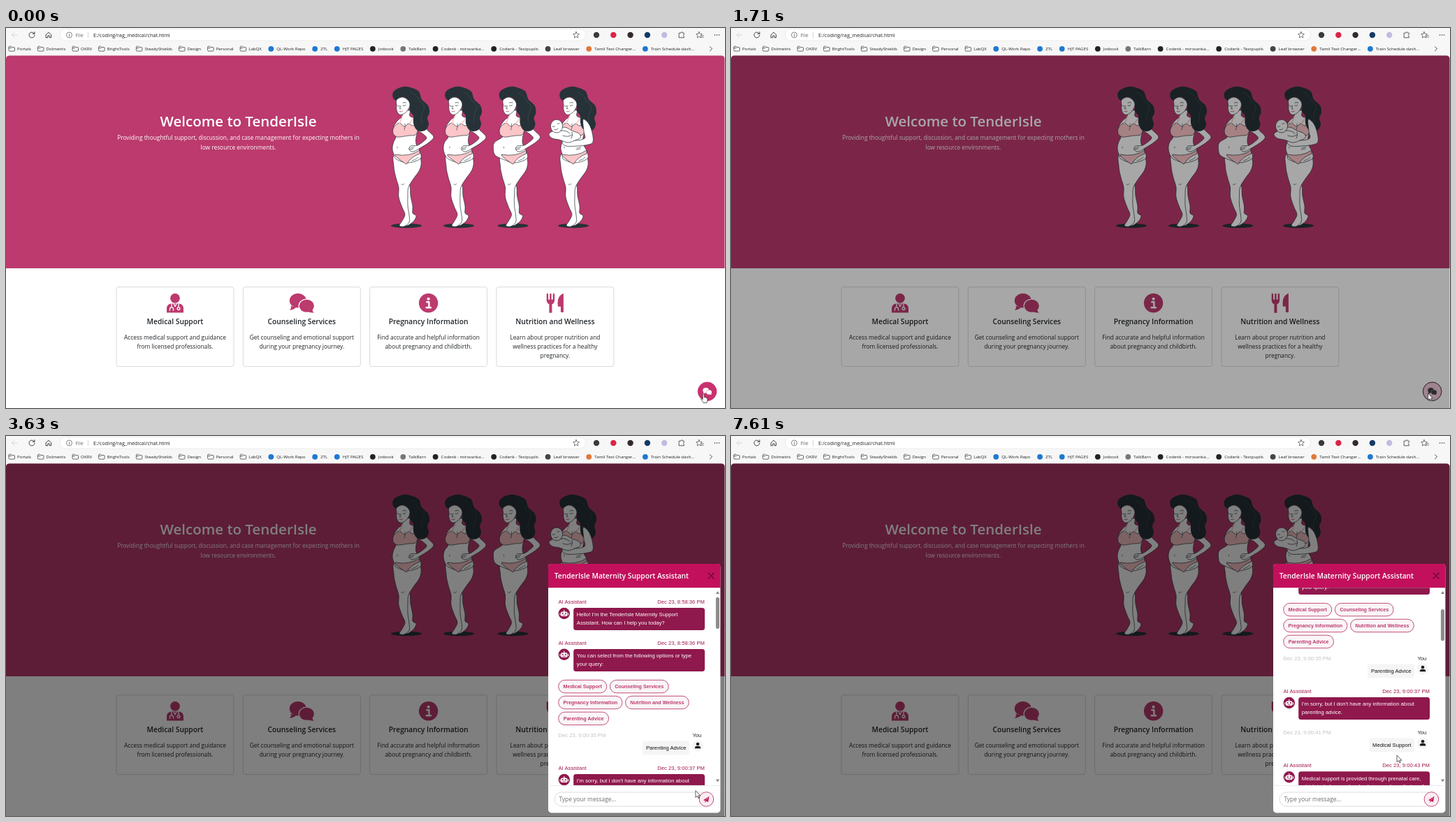
An HTML page for the animation above (8 s loop, 1029 by 544 pixels).

```html
<!DOCTYPE html>
<html lang="en">
<head>
<meta charset="utf-8">
<title>TenderIsle</title>
<style>
html, body { margin: 0; width: 100%; height: 100%; overflow: hidden; background: #fff; }
svg { display: block; width: 100vw; height: 100vh; }
text { font-family: "Open Sans", "Noto Sans", sans-serif; white-space: pre; }
.arial { font-family: "Liberation Sans", Arial, sans-serif; }
.line { fill: none; stroke-linecap: round; stroke-linejoin: round; }
.skin * { stroke: #263238; stroke-width: .7; }
</style>
</head>
<body>
<svg id="stage" viewBox="0 0 1029 544" preserveAspectRatio="none"></svg>
<script>
const LOOP = 8000;
const PINK = '#bc3a6e', WINE = '#8f184c', INK = '#263238';
const BRAND = 'TenderIsle';
const MID = 'text-anchor="middle"', END = 'text-anchor="end"', SEMI = 'font-weight="600"';

// ---------- drawing helpers ----------
const text = (x, y, size, str, fill = '#222', opt = '') =>
  `<text x="${x}" y="${y}" font-size="${size}" fill="${fill}" ${opt}>${str}</text>`;
const arial = (x, y, str, fill, opt = '', size = 7.68) => text(x, y, size, str, fill, `class="arial" ${opt}`);
const path = (d, fill, opt = '') => `<path d="${d}" fill="${fill}" ${opt}/>`;
const line = (d, color, w = .9) => `<path class="line" d="${d}" stroke="${color}" stroke-width="${w}"/>`;
const circle = (x, y, r, fill, opt = '') => `<circle cx="${x}" cy="${y}" r="${r}" fill="${fill}" ${opt}/>`;
const oval = (x, y, rx, ry, fill, opt = '') =>
  `<ellipse cx="${x}" cy="${y}" rx="${rx}" ry="${ry}" fill="${fill}" ${opt}/>`;
const box = (x, y, w, h, r, fill, opt = '') =>
  `<rect x="${x}" y="${y}" width="${w}" height="${h}" rx="${r}" fill="${fill}" ${opt}/>`;
const group = (body, opt = '') => `<g ${opt}>${body}</g>`;
const at = (x, y, body, scale = 1) => group(body, `transform="translate(${x} ${y}) scale(${scale})"`);
// Rectangle with only the top corners rounded.
const sheet = (x, y, w, h, r, fill, opt) =>
  path(`M${x} ${y + h}v${r - h}q0 ${-r} ${r} ${-r}h${w - 2 * r}q${r} 0 ${r} ${r}v${h - r}z`, fill, opt);

// Closed smooth curve through a few key points.
function blob(points, fill) {
  const p = points.split(' ').map(s => s.split(',').map(Number));
  const get = i => p[(i + p.length) % p.length];
  const lean = (i, dir) => get(i).map((v, k) => (v + dir * (get(i + 1)[k] - get(i - 1)[k]) / 6).toFixed(2));
  return path(`M${p[0]}` + p.map((_, i) => `C${lean(i, 1)} ${lean(i + 1, -1)} ${get(i + 1)}`).join('') + 'Z', fill);
}

const pen = document.createElement('canvas').getContext('2d');
function widthOf(str, size, family, weight = 400) {
  pen.font = `${weight} 100px ${family}`;
  return pen.measureText(str).width * size / 100;
}
const SANS = '"Open Sans", "Noto Sans", sans-serif', ARIAL = '"Liberation Sans", Arial, sans-serif';

// ---------- browser bars ----------
const star = x => line(`M${x} 5.4l1.3 2.900 3.1.4-2.300 2.100.6 3.200-2.700-1.600-2.700 1.600.6-3.200-2.300-2.100 3.100-.4z`, '#444', .7);

function toolbar() {
  const addons = ['#3a3a3a', '#dc2446', '#33282c', '#123a66', '#c3bbdf'].map((c, i) => circle(845 + i * 24.3, 10, 4.2, c));
  const dots = [-3, 0, 3].map(dx => circle(1017.5 + dx, 10, .8, '#333'));
  return box(0, 0, 1029, 46, 0, '#f7f7f7')
    + box(77.5, 1.5, 752, 16.5, 8.2, '#fff', 'stroke="#e2e2e2" stroke-width=".6"')
    + line('M16 10H8.5M11.7 6.7L8.4 10l3.3 3.3', '#cfcfcf', .8)
    + line('M40.6 8.2A4 4 0 1 0 41 10.4M41 5.6V8.4H38.2', '#333')
    + line('M57.4 9.6L61 6.2l3.6 3.4V13.8H62.2V11H59.8v2.8H57.4z', '#333')
    + circle(90.5, 10, 4, 'none', 'stroke="#555" stroke-width=".7"') + line('M90.5 9.6V12M90.5 8v.1', '#555', .8)
    + text(99.5, 12.6, 7, 'File', '#666') + line('M117.5 6v8', '#bbb', .6)
    + text(125, 12.6, 7.3, 'E:/coding/rag_medical/chat.html') + star(816)
    + line('M963.5 7.2h2.2a1.4 1.4 0 0 1 2.8 0h1.8v2.2a1.4 1.4 0 0 0 0 2.6v1.8h-6.8z', '#333', .8)
    + star(992) + line('M995.4 10.8h3M995.4 13h3', '#444', .7) + addons.join('') + dots.join('');
}

const FOLDERS = ['Portals', 'Dolmetris', 'OKRV', 'BrightTools', 'SteadyShields', 'Design', 'Personal', 'LabQX'];
const SITES = [
  ['QL-Work Repo', '#1f78d1'], ['ZTL', '#1f78d1'], ['HJT PAGES', '#1f78d1'], ['Jotbook', '#222'],
  ['TalkBarn', '#777'], ['Codenk - mirovanka...', '#222'], ['Codenk - Testpupils', '#222'],
  ['Leaf browser', '#444'], ['Tamil Text Changer...', '#e0793c'], ['Train Schedule dash...', '#1f78d1']
];
function bookmarks() {
  const size = 6.15, gap = 21.5;
  let x = 16;
  return [...FOLDERS.map(name => [name]), ...SITES].map(([name, color]) => {
    const icon = color ? circle(x - 8, 29.8, 3.9, color)
      : line(`M${x - 12} 27.2q0-1 1-1h2l1.2 1.3h3.2q1 0 1 1v3.6q0 1-1 1h-6.4q-1 0-1-1zM${x - 12} 28.6h3.4`, '#444', .8);
    const label = text(x, 32, size, name);
    x += widthOf(name, size, SANS) + gap;
    return icon + label;
  }).join('') + line('M1007.5 26.8l3 3-3 3', '#333');
}

// ---------- hero figures ----------
const HAIR = blob('574,84 562,86 554,92 554,100 559,104 563,100 570,99 576,104 578,112 578,119 583,126 583,136 587,145 594,148 602,145 605,137 603,129 606,121 604,111 595,102 590,90', INK);
const FACE = blob('559,103 559,110 559,117 562,123 567,124 574,119 578,110 575,103 567,99', '#fff');
const LEGS = blob('572,222 578,226 579,240 582,255 582,265 587,269 583,277 574,283 572,279 576,269 571,250', '#fff')
  + blob('557,180 555,198 558,214 562,228 562,242 567,257 571,267 567,276 563,283 570,284 577,278 577,268 575,254 575,240 576,228 583,216 592,203 594,190 588,178', '#fff');
const BRA = blob('555,142 554,151 560,156 570,155 577,154 586,153 589,146 587,138 582,140 576,137 570,141 563,136', '#fcc5c8');
const BRIEF = path('M557 181Q577 185 592 175V180Q580 184 573 195Q566 191 557 183Z', '#fcc5c8');
const ARM = blob('586,131 595,137 604,147 612,156 605,164 594,171 583,177 577,174 579,169 589,168 598,162 602,157 596,151 587,144', '#fff');
const CRADLE = blob('587,131 595,137 600,150 601,163 594,167 578,169 563,169 557,164 561,159 575,161 589,158 588,148', '#fff');
const BABY = blob('545,147 538,152 543,158 553,160 565,164 575,161 583,157 581,151 571,147 560,142', '#fff')
  + oval(549, 140.5, 8.6, 9.4, '#fff')
  + line('M543 141q2 1.4 3.4-.4M550 137q1.6 1 3-.6M546 145.5q3 1.4 5-1.6M555 147q8-1 13 4M558 154q7 3 13-1M571 149q2 4-1 9', INK);

// belly: leftmost x of the bump
function woman(dx, belly, baby) {
  const torso = blob(`568,120 567,127 561,132 555,141 555,151 558,156 ${belly + 1.5},164 ${belly},173 ${belly + 2.5},182 559,188 575,193 593,187 592,176 587,166 587,156 590,146 591,136 587,130 578,126 578,118`, '#fff');
  return at(dx, 0, oval(573, 283, 22, 3.3, INK)
    + group(LEGS + torso + BRIEF + BRA + (baby ? '' : ARM), 'class="skin"')
    + line('M563 137L567.5 126M577 137L583 129.5', '#fcc5c8', 1.6)
    + line('M571 137q1 5-1 9M560 170q.6 1 0 2M578 172l6-1.5M577 174l6-1M581 190q5-1 9-5M566 224q3 1 4-1', INK, .6)
    + HAIR + group(FACE + (baby ? CRADLE + BABY : ''), 'class="skin"')
    + line('M560.5 111.5q2 1.5 3.600 0M568 111q2.400 1.400 4-.6M568 107q2.400-1 4.600 0M565 112l-1.800 3.400 2 .4', INK, .7)
    + line('M563 119.4q2 1.400 4.400-.4', '#c8586a')
    + line('M579 92q10 3 13 13q9 4 6 12q-5 9-3 18', '#46545b', .5));
}

// ---------- page ----------
// Two overlapping speech bubbles, centred on the origin.
const comments = (fill, gap) =>
  path('M-16 4Q-14 7-17.500 10Q-12 10-8 6Z', fill) + oval(-5.5, -3.5, 12, 10.3, fill)
  + group(oval(7, 4, 10.6, 9, fill), `stroke="${gap}" stroke-width="2.4" paint-order="stroke"`)
  + path('M16 8Q14 11 17.500 14Q12 14 8 12Z', fill);

const doctor = circle(0, -7, 6.9, PINK) + sheet(-12, .6, 24, 13, 7.5, PINK)
  + line('M-5 1V6M-7.500 10.500V8.500Q-7.500 6-5 6T-2.500 8.500V10.500M5 1V6M-2 1L0 5 2 1', '#fff', 1.3)
  + circle(5, 7.8, 1.9, 'none', 'stroke="#fff" stroke-width="1.3"');
const info = circle(0, 0, 13.7, PINK) + circle(0, -6, 2.1, '#fff')
  + line('M-2.300-1.500H.8V6M-3 6.400H3.400', '#fff', 2.4);
const cutlery = line('M-11-12.500V-4M-6.500-12.500V-4M-2-12.500V-4', PINK, 2.4)
  + sheet(-8.5, 0, 4, 14, 1, PINK) + path('M-12.200-5H-.8Q-.8 2-6.500 2T-12.200-5Z', PINK)
  + path('M12-13.700V12.500Q10 14.500 8 12.500V5H4Q2-10 12-13.700Z', PINK);

const CARDS = [
  [doctor, 'Medical Support', 'Access medical support and guidance', 'from licensed professionals.'],
  [comments(PINK, '#fff'), 'Counseling Services', 'Get counseling and emotional support', 'during your pregnancy journey.'],
  [info, 'Pregnancy Information', 'Find accurate and helpful information', 'about pregnancy and childbirth.'],
  [cutlery, 'Nutrition and Wellness', 'Learn about proper nutrition and', 'wellness practices for a healthy', 'pregnancy.']
];
function card([icon, title, ...rows], i) {
  const x = 242 + i * 181.3;
  return box(x - 84, 370.8, 168, 113.8, 3.3, 'none', 'stroke="#d5d5d5" stroke-width=".9"')
    + at(x, 393.8, icon) + text(x, 423.7, 10.25, title, '#212529', `${MID} ${SEMI}`)
    + rows.map((row, n) => text(x, 445.5 + n * 13.1, 8.35, row, '#212529', MID)).join('');
}

function page() {
  return sheet(0, 39.5, 1028.5, 504.5, 5, '#fff') + sheet(0, 39.5, 1028.5, 304.5, 5, PINK)
    + text(332.5, 141.2, 20.5, `Welcome to ${BRAND}`, '#fff', `${MID} ${SEMI}`)
    + text(332.5, 160.4, 8.34, 'Providing thoughtful support, discussion, and case management for expecting mothers in', '#fff', MID)
    + text(332.5, 173.5, 8.34, 'low resource environments.', '#fff', MID)
    + woman(0, 553) + woman(75, 551) + woman(152.5, 545) + woman(239, 555, true)
    + CARDS.map(card).join('')
    + group(circle(1003.6, 520.3, 13.3, 'var(--fill)', 'stroke="var(--rim)"')
      + at(1003.6, 520, comments('var(--icon)', 'var(--fill)'), .36), 'id="opener"');
}

// ---------- chat window ----------
const robot = box(-4.6, -2.6, 9.2, 6.6, 1.6, '#fff') + line('M0-4.800V-2.500M-5.800-.3V2M5.800-.3V2', '#fff', 1.1)
  + circle(-2, 0, 1, WINE) + circle(2, 0, 1, WINE) + line('M-2 2.400H2', WINE, .7);
const person = circle(0, -2, 2.3, '#1b1b1b') + sheet(-4.2, .9, 8.4, 3.3, 2.7, '#1b1b1b');

const botSays = (y, time, ...rows) =>
  arial(790.5, y + 2.7, 'AI Assistant', '#a3174f') + arial(1000, y + 2.7, time, '#a3174f', END)
  + circle(798.8, y + 16.6, 8.2, WINE) + at(798.8, y + 16.6, robot)
  + box(812.2, y + 8.7, 187.8, 8.6 + rows.length * 11.7, 3.5, WINE)
  + rows.map((row, i) => arial(816.8, y + 21 + i * 11.6, row, '#fff')).join('');

function userSays(y, time, msg) {
  const w = widthOf(msg, 7.68, ARIAL) + 9;
  return arial(790.5, y + 2.7, time, '#c2c2c2') + arial(995.4, y + 2.7, 'You', '#222', END)
    + box(978 - w, y + 8.4, w, 20, 3.5, '#f5f5f5') + arial(973.5, y + 21, msg, '#111', END)
    + circle(990, y + 15.5, 8.2, '#f5f5f5') + at(990, y + 15, person);
}

// Pills flow from left to right and wrap at the edge.
function options(y) {
  const left = 790.7, size = 7.13;
  let x = left;
  return [...CARDS.map(c => c[1]), 'Parenting Advice'].map(label => {
    const w = widthOf(label, size, ARIAL, 700) + 13.6;
    if (x + w > 1000) { x = left; y += 22.9; }
    const pill = box(x, y - 9.2, w, 18.4, 9.2, '#faf5f7', `stroke="${PINK}" stroke-width=".9"`)
      + arial(x + w / 2, y + 2.5, label, PINK, `${MID} font-weight="700"`, size);
    x += w + 4.6;
    return pill;
  }).join('');
}

const messages = () =>
  botSays(237.4, 'Dec 23, 8:58:36 PM', `Hello! I'm the ${BRAND} Maternity Support`, 'Assistant. How can I help you today?')
  + botSays(296.2, 'Dec 23, 8:58:36 PM', 'You can select from the following options or type', 'your query:')
  + options(358.6)
  + userSays(428, 'Dec 23, 9:00:35 PM', 'Parenting Advice')
  + botSays(475.4, 'Dec 23, 9:00:37 PM', "I'm sorry, but I don't have any information about", 'parenting advice.')
  + userSays(534.2, 'Dec 23, 9:00:41 PM', 'Medical Support')
  + botSays(581.6, 'Dec 23, 9:00:43 PM', 'Medical support is provided through prenatal care,', 'which includes regular check-ups and monitoring of', 'your health.');

function chat() {
  return box(776, 183, 246.4, 356.4, 4.4, '#fff') + sheet(776, 183, 246.4, 34.3, 4.4, '#c2105c')
    + text(784.7, 204.4, 10.25, `${BRAND} Maternity Support Assistant`, '#fff', SEMI)
    + line('M1005.2 196.2l8 8M1013.2 196.2l-8 8', '#4d0a28', 1.1)
    + group(group(messages(), 'id="thread"'), 'clip-path="url(#view)"')
    + path('M1016 226l2.5-4 2.500 4zM1016 491.5l2.5 4 2.500-4z', '#858585')
    + box(1015.9, 230.7, 5, 45.4, 2.5, '#8b8b8b', 'id="thumb"')
    + line('M776 500.4H1022.4', '#dee2e6', .7)
    + box(785, 510, 222, 20, 10, '#fff', 'stroke="#d3d3d3" stroke-width=".8"')
    + text(791.4, 523, 8.38, 'Type your message...', '#6a6d70')
    + circle(1002.4, 520, 10.3, '#faedf2', `id="send" stroke="${PINK}" stroke-width=".9"`)
    + at(1002.4, 520, path('M-4.400 1.200L4-4.200 2.600 4-.4 2.800-1.800 5-2 2.200Z', '#c2185b')
      + line('M-1.800 2.200L2.400-2.400', '#fff', .5));
}

const ARROW = 'M0 0V9.8L2.3 7.7 3.9 11 5.3 10.4 3.8 7.2H6.8Z';
const HAND = 'M-.5 1.2q1-1.500 2 0V5.500q1.200-.6 1.700.5 1.200-.5 1.700.8 1.300-.4 1.400 1V10.500l-1 3.100H.5Q0 12-2.900 8.600q.2-1.400 1.600-.6l.8.8Z';

document.getElementById('stage').innerHTML =
  `<defs><clipPath id="view">${box(776, 217.3, 239, 282.7, 0, '#fff')}</clipPath></defs>`
  + toolbar() + bookmarks() + page() + sheet(0, 39.5, 1028.5, 504.5, 5, '#000', 'id="shade"')
  + group(chat(), 'id="chat"')
  + path(ARROW, '#fff', 'id="cursor" stroke="#222" stroke-width=".7" stroke-linejoin="round"');

// ---------- motion ----------
const [opener, shade, chatBox, thread, thumb, send, cursor] =
  ['opener', 'shade', 'chat', 'thread', 'thumb', 'send', 'cursor'].map(id => document.getElementById(id));
const ramp = (t, from, to) => Math.min(1, Math.max(0, (t - from) / (to - from)));
const ease = x => x ** 1.72 / (x ** 1.72 + (1 - x) ** 1.72);
// Progress in n even jumps, the first at `from` and the last at `to`.
const jumps = (t, from, to, n) => t < from ? 0 : (1 + Math.floor(ramp(t, from, to) * (n - 1))) / n;
const mix = (a, b, k) => `rgb(${a.map((v, i) => Math.round(v + (b[i] - v) * k))})`;
const move = (el, x, y) => el.setAttribute('transform', `translate(${x} ${y})`);

function drawOpening(t) {
  const s = Math.floor((t - 20) / 70) * 70 + 20; // the picture refreshes every 70 ms
  const pale = ramp(s, 1430, 1580) * (1 - ramp(s, 1690, 1765));
  const base = mix([200, 49, 110], [200, 16, 96], ramp(s, 1430, 1600)).match(/\d+/g).map(Number);
  opener.style.setProperty('--fill', mix(base, [246, 229, 236], pale));
  opener.style.setProperty('--rim', mix(base, [40, 40, 40], pale));
  opener.style.setProperty('--icon', mix([255, 255, 255], [35, 35, 40], pale));
  shade.setAttribute('opacity', .5 * ramp(s, 1596, 1746));
  chatBox.setAttribute('opacity', ramp(s, 1755, 1905));
  move(chatBox, 0, -27.4 * (1 - ramp(s, 1755, 2050)) ** 1.7);
}

function drawCursor(t) {
  const go = ease(jumps(t, 3430, 4160, 12));
  const x = 997.6 - 46 * go + 1.4 * jumps(t, 5080, 5150, 2);
  const y = 523 - 66 * go + (t >= 980 && t < 1110 ? .6 : 0);
  const over = go > 0 && Math.hypot(x - 1002.4, y - 520) < 10.3;
  send.setAttribute('fill', over ? '#f6dbe5' : '#faedf2');
  cursor.setAttribute('d', t < 980 || over ? HAND : ARROW);
  move(cursor, x, y);
}

function drawScroll(t) {
  const top = 55 * (ease(jumps(t, 6730, 6930, 4)) + ease(jumps(t, 7400, 7610, 4)));
  move(thread, 0, -top);
  move(thumb, 0, top * .157);
}

const start = performance.now();
function frame() {
  const t = (performance.now() - start) % LOOP;
  drawOpening(t);
  drawCursor(t);
  drawScroll(t);
  requestAnimationFrame(frame);
}
frame();
</script>
</body>
</html>
```
